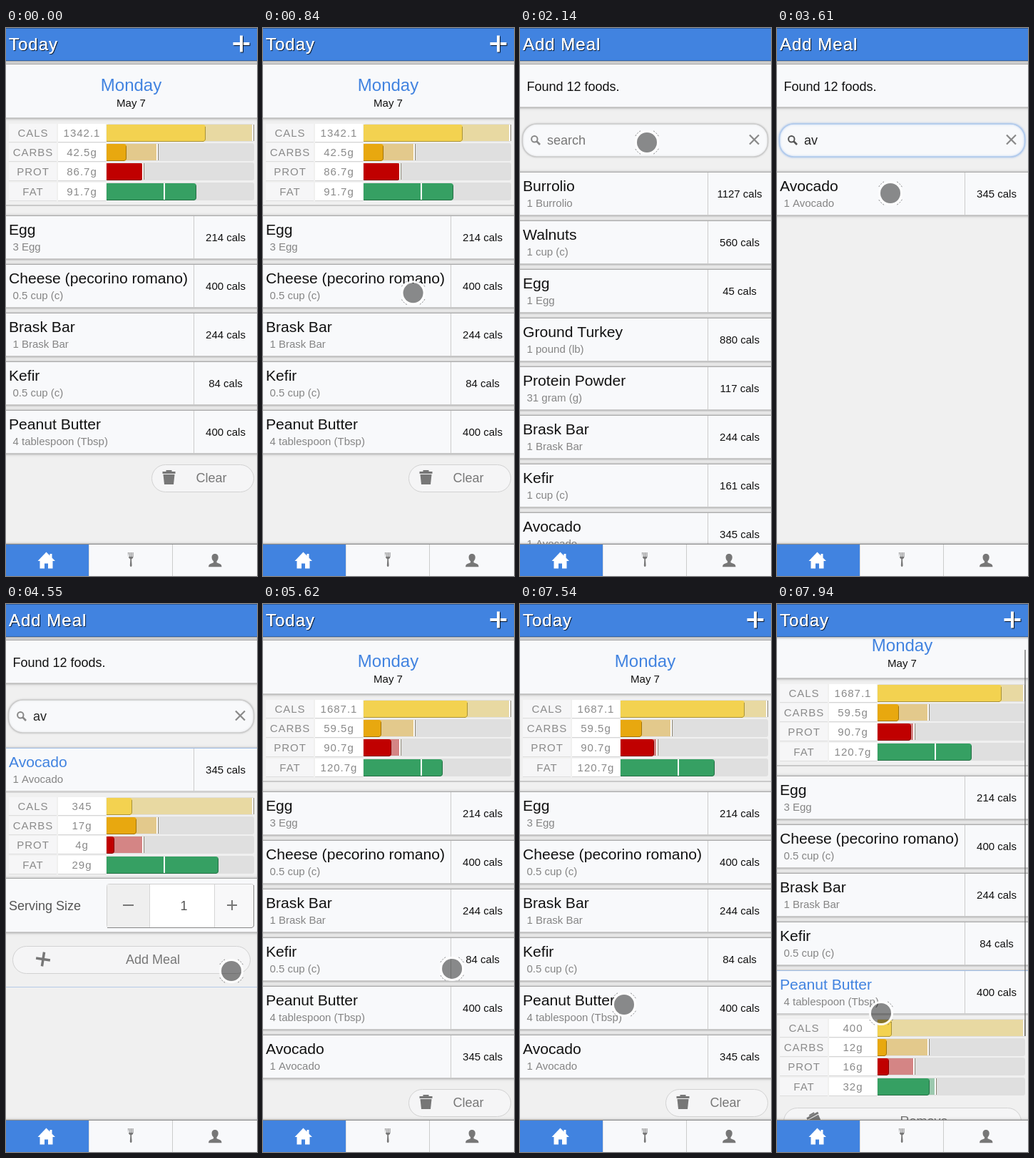
An HTML page with a canvas for the animation above (8 s loop, 352x766 px).

```html
<!DOCTYPE html>
<html lang="en">
<head>
<meta charset="utf-8">
<title>Meal tracker</title>
<style>
html, body { margin: 0; width: 100%; height: 100%; overflow: hidden; background: #f0f0f0; }
canvas { display: block; }
</style>
</head>
<body>
<canvas id="stage" width="352" height="766"></canvas>
<script>
const c = document.getElementById('stage').getContext('2d');
const BLUE = '#4183e0', CARD = '#f8f9fb', BG = '#f0f0f0', GRAY = '#777';
const LOOP = 8000;

// label, colour, remaining colour, goal position
const MACROS = [
  ['CALS', '#f3d250', '#e8d9a2', 347],
  ['CARBS', '#e8a80f', '#e3c98c', 213],
  ['PROT', '#c00000', '#d48585', 193],
  ['FAT', '#36a063', '#9cc9ae', 223]
];
const MEALS = [
  ['Egg', '3 Egg', 214],
  ['Cheese (pecorino romano)', '0.5 cup (c)', 400],
  ['Brask Bar', '1 Brask Bar', 244],
  ['Kefir', '0.5 cup (c)', 84],
  ['Peanut Butter', '4 tablespoon (Tbsp)', 400],
  ['Avocado', '1 Avocado', 345]
];
const FOODS = [
  ['Burrolio', '1 Burrolio', 1127],
  ['Walnuts', '1 cup (c)', 560],
  ['Egg', '1 Egg', 45],
  ['Ground Turkey', '1 pound (lb)', 880],
  ['Protein Powder', '31 gram (g)', 117],
  ['Brask Bar', '1 Brask Bar', 244],
  ['Kefir', '1 cup (c)', 161],
  ['Avocado', '1 Avocado', 345],
  ['Cheese (pecorino romano)', '1 cup (c)', 800],
  ['Peanut Butter', '1 tablespoon (Tbsp)', 100],
  ['Almonds', '1 cup (c)', 529],
  ['Rice', '1 cup (c)', 205]
];
// time, x, y of the pointer
const PATH = [
  [450, 76, 727], [1220, 339, 30], [1300, 343, 23], [1630, 343, 23],
  [2140, 178, 160], [3230, 178, 160], [3600, 159, 231], [4000, 159, 231],
  [4540, 316, 513], [5300, 316, 513], [5930, 217, 507], [6010, 216, 506],
  [6160, 216, 506], [6470, 243, 467], [6570, 248, 460], [7010, 143, 511],
  [7240, 170, 530], [7540, 146, 560], [7710, 146, 560], [7930, 146, 572]
];

function ease(t, a, b) {
  const p = Math.min(1, Math.max(0, (t - a) / (b - a)));
  return p * p * (3 - 2 * p);
}

function text(s, x, y, size, color, align = 'left', spacing = 0) {
  c.font = size + 'px "Liberation Sans", Arial, sans-serif';
  c.letterSpacing = spacing + 'px';
  c.textAlign = align;
  c.fillStyle = color;
  c.fillText(s, x, y);
}

function rect(x, y, w, h, color) {
  c.fillStyle = color;
  c.fillRect(x, y, w, h);
}

function round(x, y, w, h, r, fill, stroke, width = 1) {
  c.beginPath();
  c.roundRect(x, y, w, h, r);
  if (fill) { c.fillStyle = fill; c.fill(); }
  if (stroke) { c.strokeStyle = stroke; c.lineWidth = width; c.stroke(); }
}

function line(points, color, width) {
  c.beginPath();
  points.forEach(([x, y], i) => i ? c.lineTo(x, y) : c.moveTo(x, y));
  c.strokeStyle = color;
  c.lineWidth = width;
  c.stroke();
}

function shadow(color, blur, dx = 0, dy = 0) {
  c.shadowColor = color;
  c.shadowBlur = blur;
  c.shadowOffsetX = dx;
  c.shadowOffsetY = dy;
}

function strip(y, h, edge = '#a9a9a9') {
  c.save();
  shadow('rgba(0,0,0,.5)', 4);
  rect(-8, y, 368, h, CARD);
  c.restore();
  rect(0, y - 1, 352, 1, edge);
  rect(0, y + h - 1, 352, 1, '#ccc');
}

function plus(x, y, size, width, color, angle = 0) {
  c.save();
  c.translate(x, y);
  c.rotate(angle);
  rect(-size / 2, -width / 2, size, width, color);
  rect(-width / 2, -size / 2, width, size, color);
  c.restore();
}

function trash(x, y, angle = 0) {
  c.save();
  c.translate(x, y);
  c.rotate(angle);
  rect(-9, -8, 18, 3, GRAY);
  rect(-4, -10, 8, 2, GRAY);
  c.beginPath();
  c.moveTo(-8, -4); c.lineTo(8, -4); c.lineTo(6.5, 10); c.lineTo(-6.5, 10);
  c.fill();
  c.restore();
}

function pill(x, y, w, label, labelX) {
  round(x + .5, y + .5, w, 38, 19, '#f5f5f6', '#d2d2d2');
  text(label, labelX, y + 25, 18, GRAY, 'center');
}

function bars(y, values, widths, grow) {
  MACROS.forEach(([label, color, rest, goal], i) => {
    const top = Math.round(y + i * 27.2), w = Math.round(widths[i] * grow);
    rect(4, top, 67, 25, '#f6f6f7');
    rect(4, top + 25, 67, 1, '#dedede');
    rect(73, top, 67, 25, '#fff');
    rect(73, top + 25, 67, 1, '#d5d5d5');
    text(label, 38, top + 18, 15, '#8a8a8a', 'center', 1);
    text(values[i], 106.5, top + 18, 15, '#8a8a8a', 'center', 1);
    round(141, top, 207, 25, 3, '#dfdfdf');
    rect(141, top + 1, goal - 143, 23, rest);
    if (w > 1) {
      round(141, top + 1, w, 24, [0, 4, 4, 0], color);
      line([[141, top + 24.5], [138 + w, top + 24.5], [140.5 + w, top + 22], [140.5 + w, top + 4]], 'rgba(0,0,0,.3)', 1);
    }
    rect(goal - 2, top + 1, 2, 23, '#fff');
    if (goal - 141 > w) rect(goal, top + 1, 1, 23, '#8c8473');
  });
}

function item([name, portion, cals], y, active) {
  strip(y, 60, active ? '#9fbde6' : undefined);
  text(name, 4, y + 26, 21.12, active ? BLUE : '#111');
  text(portion, 9.5, y + 48, 15, '#858585');
  rect(263, y, 1, 60, '#ccc');
  text(cals + ' cals', 308, y + 35, 15, '#111', 'center');
}

// Draws an opening panel, cut off at its current height
function panel(y, h, open, draw) {
  c.save();
  c.beginPath();
  c.rect(0, y, 352, h * open);
  c.clip();
  rect(0, y, 352, h, BG);
  draw();
  c.restore();
  rect(0, y + h * open, 352, 1, '#b5cae6');
  rect(0, y, 352, 2, 'rgba(0,0,0,.12)');
}

function today(t) {
  const later = t > 4000;
  const scroll = 22 * ease(t, 7710, 7935);
  c.save();
  c.translate(0, -scroll);
  strip(51, 75);
  text('Monday', 175.5, 88, 24, BLUE, 'center');
  text('May 7', 175.5, 110, 15, '#111', 'center');
  rect(0, 247, 352, 2, '#c9c9c9');
  if (later) bars(134, ['1687.1', '59.5g', '90.7g', '120.7g'], [174, 30, 47, 132], ease(t, 5100, 5800));
  else bars(134, ['1342.1', '42.5g', '86.7g', '91.7g'], [139, 28, 51, 126], 1);
  const meals = later ? MEALS : MEALS.slice(0, 5);
  const open = ease(t, 7710, 7925);
  let y = 263;
  meals.forEach(meal => {
    const active = meal[0] === 'Peanut Butter' && open > 0;
    item(meal, y, active);
    if (active) {
      const top = y;
      panel(top + 60, 190, open, () => {
        bars(top + 67, ['400', '12g', '16g', '32g'], [20, 13, 16, 73], ease(t, 7750, 7940));
        pill(9, top + 191, 333, 'Remove', 206);
        trash(53, top + 208, -.5 * ease(t, 7760, 7940));
      });
      y += 190 * open;
    }
    y += 68;
  });
  pill(204, y + 7, 143, 'Clear', 288);
  trash(228.5, y + 25);
  c.restore();
  if (scroll) rect(347, 46 + scroll * .82, 2, 540, 'rgba(90,90,90,.6)');
}

function searchBox(t, query) {
  const focus = ease(t, 2450, 2530) * (1 - ease(t, 3870, 4000));
  c.save();
  shadow(focus > .5 ? 'rgba(65,131,224,.4)' : 'rgba(0,0,0,.12)', 3);
  round(3.5, 134, 344, 46, 20, CARD, focus > .5 ? '#b0caec' : '#cbcbcb', 1.5);
  c.restore();
  const lens = focus > .5 ? '#555' : '#888';
  c.beginPath();
  c.arc(20.3, 155.3, 4.2, 0, 7);
  c.strokeStyle = lens;
  c.lineWidth = 2;
  c.stroke();
  line([[23.5, 158.5], [28, 163]], lens, 2.6);
  line([[322, 149.5], [335, 162.5]], '#888', 2.2);
  line([[335, 149.5], [322, 162.5]], '#888', 2.2);
  if (query) text(query, 38, 163, 18, '#222');
  else text('search', 38, 163, 18, GRAY);
  if (t > 2480 && t < 3400) rect(38 + query.length * 9.5, 147, 1, 20, '#222');
}

function servingRow(y) {
  strip(y, 75);
  text('Serving Size', 4, y + 44, 18, '#555');
  round(141.5, y + 7.5, 206, 61, 3, '#f8f8f9', '#d0d0d0');
  rect(142, y + 8, 60, 60, '#efefef');
  rect(202, y + 8, 90, 60, '#fff');
  rect(201, y + 8, 1, 60, '#d5d5d5');
  rect(292, y + 8, 1, 60, '#d5d5d5');
  line([[142, y + 68.5], [345, y + 68.5], [347.5, y + 66], [347.5, y + 9]], '#888', 1);
  rect(164, y + 36, 15, 2, GRAY);
  text('1', 249.5, y + 44, 18, '#555', 'center');
  plus(317, y + 37, 14, 2, GRAY);
}

function addMeal(t) {
  const query = t < 2760 ? '' : t < 3140 ? 'a' : 'av';
  strip(51, 60);
  text('Found 12 foods.', 9.5, 88, 18, '#111');
  searchBox(t, query);
  const open = ease(t, 3870, 4300);
  FOODS.filter(f => f[0].toLowerCase().includes(query))
    .forEach((food, i) => item(food, 202 + i * 68, open > 0));
  if (open > 0) panel(262, 273, open, () => {
    bars(270, ['345', '17g', '4g', '29g'], [36, 42, 11, 157], ease(t, 3950, 4500));
    servingRow(384);
    pill(9, 478, 333, 'Add Meal', 206);
    plus(52, 496.5, 20, 3.5, GRAY, Math.PI / 2 * ease(t, 4460, 4930));
  });
}

function header(title, showPlus) {
  c.save();
  shadow('rgba(0,0,0,.6)', 4);
  rect(-8, -8, 368, 54, BLUE);
  c.restore();
  rect(0, 0, 352, 1, '#2c5a9c');
  rect(0, 45, 352, 1, '#2f62a8');
  const label = () => text(title, 4, 31, 24, '#fff', 'left', 1);
  c.save();
  shadow('rgba(0,0,0,.85)', 1, 1, 1);
  label();
  if (showPlus) plus(330, 22, 23, 4, '#fff');
  c.restore();
  label();
}

function nav() {
  c.save();
  shadow('rgba(0,0,0,.6)', 4);
  rect(-8, 722, 368, 52, CARD);
  c.restore();
  rect(0, 721, 352, 1, '#888');
  rect(0, 722, 116, 44, BLUE);
  rect(116, 722, 1, 44, '#ddd');
  rect(233, 722, 1, 44, '#ccc');
  // home
  c.fillStyle = '#fff';
  c.fill(new Path2D('M44.500 745 56.500 732.500 61.500 737.500V735h3v5.500L69 745H65.500V755.500H59V748.500h-5v7H47.500V745Z'));
  // fork
  c.fillStyle = GRAY;
  c.fill(new Path2D('M171 733h1v6h1.200v-6h1v6h1.200v-6h1v6h1.200v-6h.9v6q0 2.500-2.500 3.500l.6 9q-1.400 3.500-2.800 0l.6-9q-2.500-1-2.500-3.500Z'));
  // person
  c.fill(new Path2D('M293 735c3.500 0 5 2.500 4.700 5.500-.2 2-1 3.500-2.200 4.700v2l5 2q2 1 2 4H284q0-3 2-4l5-2v-2c-1.500-1.200-2.200-2.700-2.400-4.700-.3-3 1-5.500 4.400-5.500Z'));
}

function pointer(t) {
  if (t < PATH[0][0]) return;
  let i = PATH.findIndex(k => k[0] > t);
  if (i < 0) i = PATH.length - 1;
  const [ta, xa, ya] = PATH[i - 1], [tb, xb, yb] = PATH[i];
  const p = ease(t, ta, tb);
  c.save();
  c.translate(xa + (xb - xa) * p, ya + (yb - ya) * p);
  const ring = (r, color, width) => {
    c.beginPath();
    c.arc(0, 0, r, 0, 2 * Math.PI);
    c.strokeStyle = color;
    c.lineWidth = width;
    c.stroke();
  };
  ring(15.6, 'rgba(255,255,255,.9)', 3);
  c.fillStyle = 'rgba(0,0,0,.45)';
  c.fill(new Path2D('M-14 0a14 14 0 1 0 28 0a14 14 0 1 0-28 0Z'));
  // dotted marks on the diagonals
  c.setLineDash([0, 9.1, 2, 2, 2, 2, 2, 9.96]);
  ring(18.5, 'rgba(90,90,90,.75)', 1);
  c.restore();
}

function page(t, adding) {
  rect(0, 0, 352, 766, BG);
  c.save();
  c.beginPath();
  c.rect(0, 46, 352, 676);
  c.clip();
  adding ? addMeal(t) : today(t);
  c.restore();
  header(adding ? 'Add Meal' : 'Today', !adding);
}

function draw(t) {
  page(t, t >= 1680 && t < 5240);
  nav();
  pointer(t);
}

function tick() {
  draw(performance.now() % LOOP);
  requestAnimationFrame(tick);
}
tick();
</script>
</body>
</html>
```
